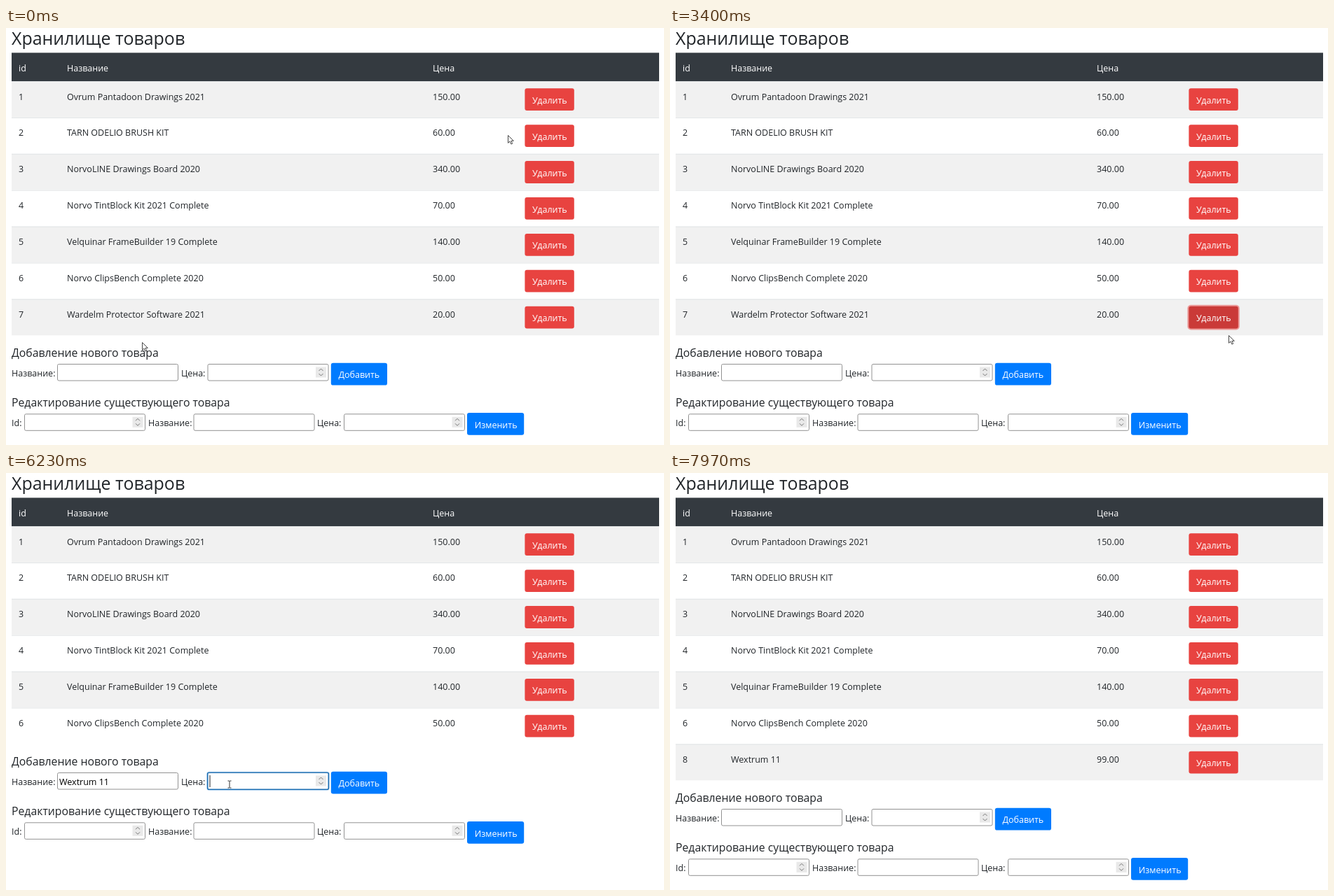
Write an HTML page that moves like this. It is 939 px wide and 596 px high and loops after 8000 ms.

```html
<!DOCTYPE html>
<html lang="ru">
<head>
<meta charset="utf-8">
<title>Хранилище товаров</title>
<style>
  html, body { margin: 0; width: 100%; height: 100%; overflow: hidden; background: #fff; }
  svg { display: block; font-family: "Open Sans", "Noto Sans", sans-serif; }
  text { white-space: pre; }
</style>
</head>
<body>
<svg id="stage" width="939" height="596" viewBox="0 0 939 596"></svg>
<script>
const LOOP = 8000, BODY = 12.5, ROW = 51.9, TABLE_TOP = 76;
const RED = '#e84340', BLUE = '#007bff';
const NEW_NAME = 'Wextrum 11';

const products = [
  [1, 'Ovrum Pantadoon Drawings 2021', '150.00'],
  [2, 'TARN ODELIO BRUSH KIT', '60.00'],
  [3, 'NorvoLINE Drawings Board 2020', '340.00'],
  [4, 'Norvo TintBlock Kit 2021 Complete', '70.00'],
  [5, 'Velquinar FrameBuilder 19 Complete', '140.00'],
  [6, 'Norvo ClipsBench Complete 2020', '50.00'],
];
const removed = [7, 'Wardelm Protector Software 2021', '20.00'];
const added = [8, NEW_NAME, '99.00'];

// Moments of the story, in ms
const at = {
  deleteClick: 3130, rowGone: 3500, nameFocus: 3970, typeW: 4570, list: 4700, pick: 5700,
  priceFocus: 6200, nine1: 6600, nine2: 6800, addClick: 7430, rowAdded: 7640,
};

// Pointer path: time, x, y
const path = [
  [0, 716, 153], [300, 722, 151], [1270, 722, 151], [1630, 860, 406], [2470, 860, 406],
  [2730, 782, 409], [3130, 782, 409], [3400, 797, 439], [3900, 127, 442], [5370, 127, 442],
  [5560, 115, 460], [5730, 115, 460], [6100, 319, 445], [6830, 319, 445], [7130, 509, 442],
];

const text = (x, y, s, size = BODY, fill = '#212529') =>
  `<text x="${x}" y="${y}" font-size="${size}" fill="${fill}">${s}</text>`;
const rect = (x, y, w, h, fill, extra = '') =>
  `<rect x="${x}" y="${y}" width="${w}" height="${h}" fill="${fill}" ${extra}/>`;
const line = (d, stroke, width = 1) =>
  `<path d="${d}" fill="none" stroke="${stroke}" stroke-width="${width}"/>`;
const inside = (p, x, y, w, h) => p.x >= x && p.x <= x + w && p.y >= y && p.y <= y + h;

function pointerAt(t) {
  const i = path.findIndex(k => k[0] > t);
  if (i < 0) { const [, x, y] = path[path.length - 1]; return { x, y }; }
  const [t0, x0, y0] = path[i - 1], [t1, x1, y1] = path[i];
  const u = (t - t0) / (t1 - t0), e = u * u * (3 - 2 * u);
  return { x: x0 + (x1 - x0) * e, y: y0 + (y1 - y0) * e };
}

function button(p, x, y, w, label, color, focused) {
  const h = 31.8, hover = inside(p, x, y, w, h);
  if (hover) p.kind = 'hand';
  const ring = focused ? rect(x - 2, y - 2, w + 4, h + 4, color, 'rx="5" opacity=".5"') : '';
  const shade = hover || focused ? rect(x, y, w, h, '#000', 'rx="3" opacity=".13"') : '';
  return ring + rect(x, y, w, h, color, 'rx="3"') + shade + text(x + 10.7, y + 21.5, label, BODY, '#fff');
}

function field(p, x, y, { spin, focused, value = '', caret } = {}) {
  if (inside(p, x, y, spin ? 153 : 173, 24)) p.kind = 'beam';
  let s = focused
    ? rect(x - 1, y - 1, 175, 26.5, 'none', 'rx="3" stroke="#c4def5"') +
      rect(x + .2, y + .2, 172.6, 24, '#fff', 'rx="2" stroke="#1f6fb2" stroke-width="1.6"')
    : rect(x + .5, y + .5, 172, 23.5, '#fff', 'rx="2" stroke="#929292"');
  if (spin) {
    const cx = x + 162, cy = y + 12;
    s += rect(cx - 7.5, cy - 7.5, 15, 15, '#e9e9e9') +
      line(`M${cx - 3} ${cy - 2}l3-3 3 3M${cx - 3} ${cy + 2}l3 3 3-3`, '#777');
  }
  s += text(x + 3, y + 18, value, BODY, '#000');
  if (caret) {
    const cx = x + 3.5 + { 0: 0, 1: value === 'W' ? 12 : 7, 2: 14.2 }[value.length];
    s += line(`M${cx} ${y + 4}v17`, '#222');
  }
  return s;
}

function tableRow([id, name, price], i, p, focused) {
  const y = TABLE_TOP + i * ROW;
  return rect(8, y, 924, ROW, i % 2 ? '#fff' : '#f1f1f1') + rect(8, y, 924, 1, '#e2e4e6') +
    text(18, y + 26.5, id) + text(87, y + 26.5, name) + text(609, y + 26.5, price) +
    button(p, 740.4, y + 10.3, 70.4, 'Удалить', RED, focused);
}

function cursor({ x, y, kind = 'arrow' }) {
  const shapes = {
    arrow: `<path d="M.5 .5V11.3L3 9l1.9 4 1.8-.8L4.9 8.3h3.4z" fill="#fff" stroke="#333" stroke-width=".9"/>`,
    hand: `<path d="M-.8 1.2Q.5-.4 1.6 1.2V5.4L5.3 6.4Q6.4 6.8 6.2 8.2L5.2 14.5H-.8L-4.3 9.6Q-4.6 8-3 8.3L-.8 9.8z"
      fill="#fff" stroke="#222" stroke-width=".9"/>`,
    beam: line('M-2.5-5H-.5L0-4.5 .5-5H2.5M0-4.5V4.5M-2.5 5H-.5L0 4.5 .5 5H2.5', '#333'),
  };
  return `<g transform="translate(${x} ${y})">${shapes[kind]}</g>`;
}

function scene(t) {
  const p = pointerAt(t);
  const short = t >= at.rowGone && t < at.rowAdded;
  const dy = short ? -52 : 0;
  const blink = since => t >= since && Math.floor((t - since) / 530) % 2 === 0;

  const rows = short ? products : [...products, t < at.rowGone ? removed : added];
  let s = text(8, 24, 'Хранилище товаров', 24.95) + rect(8, 35.4, 924, 40.6, '#343a40') +
    text(18, 61.7, 'id', BODY, '#fff') + text(87, 61.7, 'Название', BODY, '#fff') +
    text(609, 61.7, 'Цена', BODY, '#fff');
  rows.forEach((r, i) => s += tableRow(r, i, p, r === removed && t >= at.deleteClick));

  const name = !short || t < at.typeW ? '' : t < at.pick ? 'W' : NEW_NAME;
  const price = !short || t < at.nine1 ? '' : t < at.nine2 ? '9' : '99';
  const nameFocus = short && t >= at.nameFocus && t < at.priceFocus;
  const adding = short && t >= at.addClick;
  const priceFocus = short && t >= at.priceFocus && !adding;
  const lastKey = t < at.nine1 ? at.priceFocus : t < at.nine2 ? at.nine1 : at.nine2;

  s += text(8, 470 + dy, 'Добавление нового товара', 15.8) +
    text(8, 498 + dy, 'Название:') +
    field(p, 73, 480 + dy, {
      focused: nameFocus, value: name,
      caret: nameFocus && t < at.pick && blink(t < at.typeW ? at.nameFocus : at.typeW),
    }) +
    text(250, 498 + dy, 'Цена:') +
    field(p, 287.5, 480 + dy, { spin: true, focused: priceFocus, value: price, caret: priceFocus && blink(lastKey) }) +
    button(p, 463.8, 478.8 + dy, 80.2, 'Добавить', BLUE, adding);

  s += text(8, 541 + dy, 'Редактирование существующего товара', 15.8) +
    text(8, 569 + dy, 'Id:') + field(p, 26, 551.3 + dy, { spin: true }) +
    text(203, 569 + dy, 'Название:') + field(p, 267.5, 551.3 + dy) +
    text(444, 569 + dy, 'Цена:') + field(p, 482, 551.3 + dy, { spin: true }) +
    button(p, 658, 550 + dy, 81.2, 'Изменить', BLUE);

  if (t >= at.list && t < at.pick) {
    const over = inside(p, 73, 453, 173, 17);
    s += rect(75, 455, 172, 16, '#999', 'opacity=".6"') +
      rect(73.5, 453.5, 172, 16, over ? '#e8e8e8' : '#fff', 'stroke="#a5a5a5"') +
      text(78, 465, NEW_NAME, 9.5, '#000');
  }
  // Pointer trail left over from the jump at the start
  if (t < 150) s += cursor({ x: 194, y: 449 });
  if (t < at.rowAdded) s += cursor(p);
  return s;
}

const stage = document.getElementById('stage');
function tick() {
  stage.innerHTML = scene(performance.now() % LOOP);
  requestAnimationFrame(tick);
}
tick();
</script>
</body>
</html>
```
